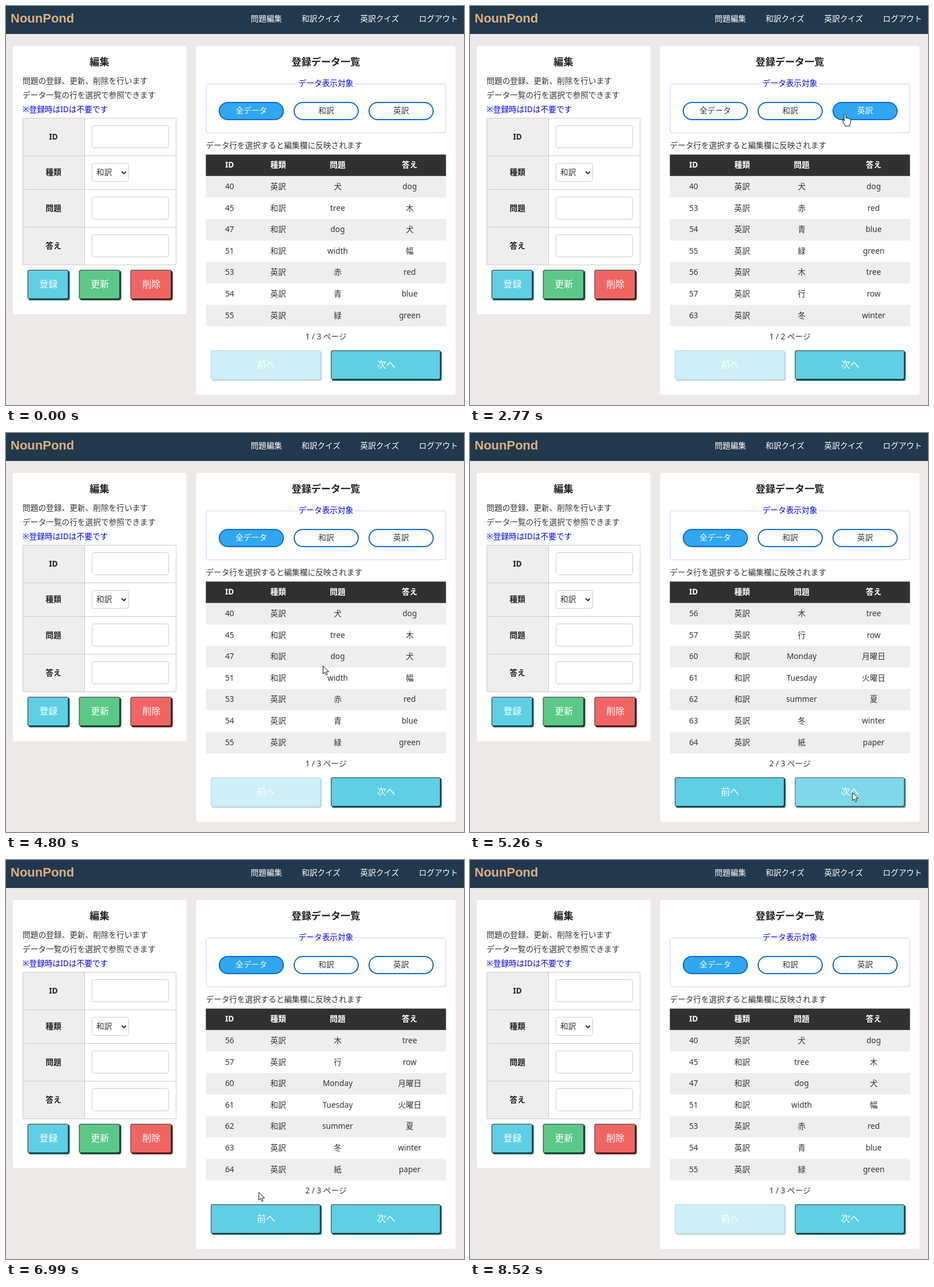
Write an HTML page that moves like this. It is 801 px wide and 699 px high and loops after 9800 ms.

```html
<!DOCTYPE html>
<html lang="ja">
<head>
<meta charset="utf-8">
<style>
  html, body { margin: 0; width: 100%; height: 100%; overflow: hidden; background: #ede9e8; }
  svg { display: block; width: 100vw; height: 100vh; }
  text { font: 13.7px "Noto Sans", "Noto Sans CJK JP", "Noto Sans CJK", sans-serif; fill: #333; text-anchor: middle; }
  .l { text-anchor: start; }
  .b { font-weight: bold; fill: #222; }
  .h { font-size: 17.15px; }
  .u { fill: #00f; }
  .w { fill: #fff; }
  .k { font-size: 16px; fill: #fff; }
  .logo { font: bold 22px "Liberation Sans", Arial, sans-serif; fill: #deb07f; }
</style>
</head>
<body>
<svg viewBox="0 0 801 699">
  <g id="page"></g>
  <g id="list"></g>
  <g id="pointer"></g>
</svg>
<script>
const LOOP = 9800, PER_PAGE = 7, ROW = 37.6;
const $ = id => document.getElementById(id);

const words = `40 英訳 犬 dog|45 和訳 tree 木|47 和訳 dog 犬|51 和訳 width 幅|53 英訳 赤 red|54 英訳 青 blue|55 英訳 緑 green
56 英訳 木 tree|57 英訳 行 row|60 和訳 Monday 月曜日|61 和訳 Tuesday 火曜日|62 和訳 summer 夏|63 英訳 冬 winter|64 英訳 紙 paper
65 和訳 tea お茶|66 和訳 spring 春|67 英訳 秋 autumn|68 和訳 water 水|69 英訳 空 sky|70 英訳 海 sea`
  .split(/[|\n]/).map(row => row.trim().split(' '));
const filters = ['全データ', '和訳', '英訳'];
const columns = [391, 476, 580, 706];

// pointer moves: start, end, steps, x, y
const origin = [783, 663];
const moves = [
  [200, 880, 11, 575, 198],
  [1740, 2220, 8, 662, 190],
  [2770, 3310, 8, 531, 184],
  [3650, 4050, 6, 440, 186],
  [4460, 5120, 10, 669, 630],
  [6380, 6520, 3, 442, 582],
  [7190, 7570, 6, 452, 626],
  [7780, 8170, 7, 713, 667],
  [8240, 8520, 5, 606, 702]
];
// clicks: press, result, filter, page number
const clicks = [
  [1280, 1410, 1, 1],
  [2290, 2360, 2, 1],
  [3380, 3450, 1, 1],
  [4130, 4200, 0, 1],
  [5190, 5260, 0, 2],
  [5920, 6050, 0, 3],
  [6920, 6990, 0, 2],
  [7640, 7710, 0, 1]
];

const text = (x, y, s, cls = '') => `<text x="${x}" y="${y + 5}" class="${cls}">${s}</text>`;
const rect = (x, y, w, h, fill, more = '') =>
  `<rect x="${x}" y="${y}" width="${w}" height="${h}" fill="${fill}" ${more}/>`;
const box = (x, y, w, h) => rect(x + .5, y + .5, w, h, '#fff', 'stroke="#ccc" rx="4"');

function button(x, y, w, label, fill, shade, mode = '') {
  const h = 52, off = mode === 'off';
  const edge = (d, color) =>
    `<path d="${d}" fill="none" stroke="${off ? '#101010' : color}" stroke-opacity="${off ? .3 : 1}" stroke-width="1.5"/>`;
  const opacity = off ? .3 : mode === 'hover' ? .8 : 1;
  return `<g opacity="${opacity}">` +
    rect(x + 1.7, y + 1.7, w, h, shade, 'rx="4"') +
    rect(x, y, w, h, fill, 'rx="4"') +
    edge(`M${x + .8} ${y + h - 2}V${y + 4}q0-3.2 3.2-3.2H${x + w - 2}`, '#5c6668') +
    edge(`M${x + w - .8} ${y + 2}V${y + h - 4}q0 3.2-3.2 3.2H${x + 2}`, '#0b1517') +
    text(x + w / 2 + .5, y + h / 2 - .5, label, 'k') + '</g>';
}

function staticPage() {
  let s = rect(0, 0, 801, 49, '#22384d') +
    '<text x="8" y="29" class="logo l">NounPond</text>';
  [['問題編集', 428], ['和訳クイズ', 517], ['英訳クイズ', 619.5], ['ログアウト', 722]]
    .forEach(([label, x]) => s += text(x, 22, label, 'l w'));

  s += rect(12, 70, 303.5, 470, '#fff', 'rx="4"') + text(163.5, 99, '編集', 'b h') +
    text(29, 131, '問題の登録、更新、削除を行います', 'l') +
    text(29, 156, 'データ一覧の行を選択で参照できます', 'l') +
    text(29, 181, '※登録時はIDは不要です', 'l u') +
    rect(29, 196, 108, 257, '#eee') +
    '<path d="M29.5 196.5H297.5V453.5H29.5ZM137.5 196V453M29 262.5H298M29 321.5H298M29 387.5H298" fill="none" stroke="#ccc"/>';
  [['ID', 229], ['種類', 291], ['問題', 354], ['答え', 420]]
    .forEach(([label, y]) => s += text(83, y, label, 'b'));
  [209, 334, 400].forEach(y => s += box(150, y, 134, 39));
  s += box(150, 275, 64, 32) + text(158, 291, '和訳', 'l') +
    '<path d="M202.3 290l3.7 3.7 3.7-3.7" fill="none" stroke="#222" stroke-width="1.8"/>' +
    button(37.5, 462, 72.5, '登録', '#5fcfe4', '#1f7486') +
    button(127.5, 462, 72.5, '更新', '#5bc888', '#1d6b40') +
    button(217.5, 462, 72.5, '削除', '#f06464', '#8d2020');
  return s;
}

const inside = (p, x, y, w, h) => p && p[0] >= x && p[0] < x + w && p[1] >= y && p[1] < y + h;
const pillX = i => 372 + 131 * i;
const overPill = (p, i) => inside(p, pillX(i), 168, 114, 32);

function listPanel(filter, page, p) {
  const all = words.filter(row => !filter || row[1] === filters[filter]);
  const pages = Math.ceil(all.length / PER_PAGE);
  const rows = all.slice((page - 1) * PER_PAGE, page * PER_PAGE);
  const end = 298 + rows.length * ROW;

  let s = rect(332.5, 70, 454, end + 50, '#fff', 'rx="4"') +
    text(559.5, 99, '登録データ一覧', 'b h') +
    rect(350, 136.5, 419, 85.5, 'none', 'stroke="#ccf" rx="4"') +
    rect(510, 130, 99, 12, '#fff') + text(559.5, 135, 'データ表示対象', 'u');
  filters.forEach((label, i) => {
    const on = i === filter;
    const fill = on ? '#30a7f0' : overPill(p, i) ? '#e3edfb' : '#fff';
    s += rect(pillX(i) + 1, 169, 112, 30, fill, 'stroke="#0b69d0" stroke-width="2" rx="15"') +
      text(pillX(i) + 57, 183, label, on ? 'w' : '');
  });
  s += text(349.5, 244, 'データ行を選択すると編集欄に反映されます', 'l') +
    rect(349.5, 260.3, 420, 37.5, '#303030');
  ['ID', '種類', '問題', '答え'].forEach((label, c) => s += text(columns[c], 278, label, 'b w'));
  rows.forEach((row, i) => {
    const y = 298 + i * ROW;
    if (i % 2 === 0) s += rect(349.5, y, 420, ROW, '#eee');
    row.forEach((cell, c) => s += text(columns[c], y + 18, cell));
  });
  s += text(559.5, end + 18, `${page} / ${pages} ページ`);

  const top = Math.round(end + 42);
  [[358, '前へ', page > 1], [568, '次へ', page < pages]].forEach(([x, label, active]) => {
    const mode = !active ? 'off' : inside(p, x, top, 193, 53) ? 'hover' : '';
    s += button(x, top, 192.5, label, '#5fcfe4', '#1f7486', mode);
  });
  return s;
}

function pointerAt(t) {
  if (t < moves[0][0] || t >= moves[moves.length - 1][1]) return null;
  let [x, y] = origin;
  for (const [start, end, steps, tx, ty] of moves) {
    if (t < start) break;
    const step = Math.min(steps - 1, Math.floor((t - start) / (end - start) * (steps - 1) + .01));
    const p = (step + 1) / steps, e = p * p * (3 - 2 * p);
    x += (tx - x) * e;
    y += (ty - y) * e;
  }
  return [x, y];
}

const hand = 'M-2 12V1.5Q-2 0-.5 0T1 1.5V7Q1 6 2.5 6T4 7.5Q4 6.7 5.3 6.7T6.7 8.2Q6.7 7.5 8 7.5T9.3 9V14Q9.3 16 7.7 18V20.5H-.5V18.5Q-4 14-5 11.5T-4.5 9.2T-2 11.5Z';
const arrow = 'M0 0V14L3.2 11L5.3 16L7.6 15L5.5 10.2H10Z';

function pointer(p, t) {
  if (!p) return '';
  const pressed = clicks.some(([down, up]) => t >= down && t < up);
  const onPill = filters.some((_, i) => overPill(p, i));
  return `<g transform="translate(${p})">` +
    (pressed ? '<circle r="10" fill="#ff0" opacity=".7"/>' : '') +
    `<path d="${onPill ? hand : arrow}" fill="#fff" stroke="#111" stroke-linejoin="round"/></g>`;
}

let shown = '';
function draw(t) {
  const p = pointerAt(t);
  const [, , filter, page] = clicks.filter(c => t >= c[1]).pop() || [0, 0, 0, 1];
  const list = listPanel(filter, page, p);
  if (list !== shown) $('list').innerHTML = shown = list;
  $('pointer').innerHTML = pointer(p, t);
}

$('page').innerHTML = staticPage();
const begin = performance.now();
function frame() {
  draw((performance.now() - begin) % LOOP);
  requestAnimationFrame(frame);
}
frame();
</script>
</body>
</html>
```
